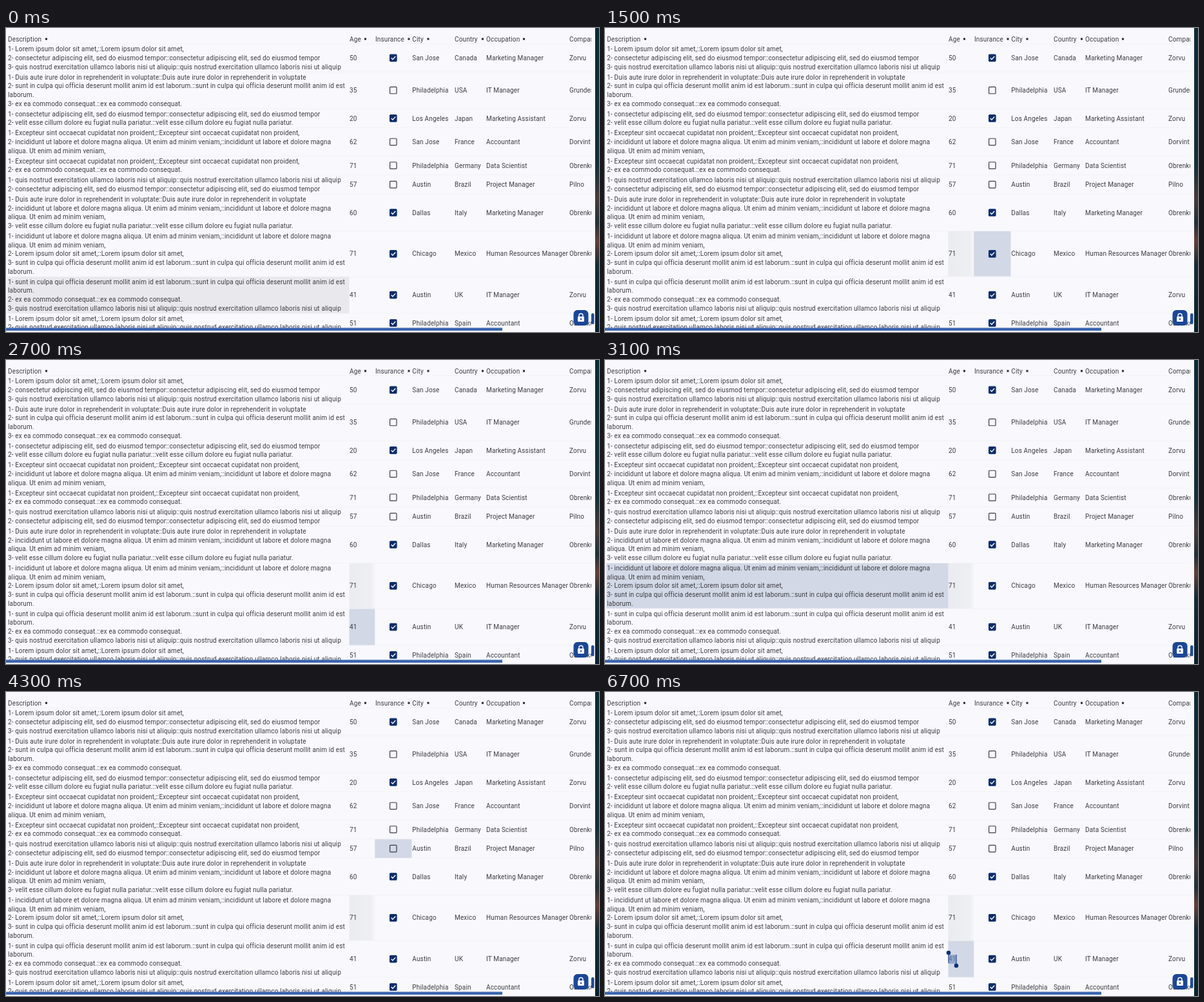
Write an HTML page that moves like this. It is 920x471 px and loops after 8 s.

```html
<!DOCTYPE html>
<html lang="en">
<head>
<meta charset="utf-8">
<title>Employee table</title>
<style>
  html, body { margin: 0; width: 100%; height: 100%; overflow: hidden; background: #f9f9fd; }
  svg { display: block; }
  text { font: 10px Roboto, Arial, sans-serif; letter-spacing: .145px; fill: #3b3b42; white-space: pre; }
</style>
</head>
<body>
<svg id="stage" width="920" height="471" viewBox="0 0 920 471">
  <defs>
    <linearGradient id="photo" x2="0" y2="1">
      <stop offset="0" stop-color="#0b2b38"/>
      <stop offset=".45" stop-color="#12303a"/>
      <stop offset=".56" stop-color="#4a3a38"/>
      <stop offset=".64" stop-color="#20313a"/>
      <stop offset=".7" stop-color="#643f38"/>
      <stop offset=".78" stop-color="#152c36"/>
      <stop offset="1" stop-color="#0a2230"/>
    </linearGradient>
    <linearGradient id="shade">
      <stop offset="0" stop-color="#ebecf0"/>
      <stop offset=".85" stop-color="#eeeff3"/>
      <stop offset="1" stop-color="#f6f6fa"/>
    </linearGradient>
    <clipPath id="bounds"><path d="M0 0H908V465H0z"/></clipPath>
  </defs>
  <rect width="920" height="471" fill="#f9f9fd"/>
  <g id="marks"></g>
  <g id="grid" clip-path="url(#bounds)"></g>
  <g id="selection" fill="#0b3178" opacity="0">
    <rect x="533" y="407" width="12" height="14" fill="#6f8fc4" opacity=".65"/>
    <path d="M532.5 404h1v16h-1zM544.5 407h1v17h-1z"/>
    <circle cx="533" cy="404" r="3.3"/><circle cx="545" cy="424" r="3.3"/>
  </g>
  <path d="M0 464.5H770V469H0z" fill="#3c66b0"/>
  <rect x="914" width="6" height="471" fill="url(#photo)"/>
  <rect x="908" y="442" width="4.5" height="17" rx="2.2" fill="#1f4b9b"/>
  <rect x="880.5" y="437" width="23" height="24" rx="6" fill="#1b4797"/>
  <path d="M889 447.5V445.5a3 3 0 0 1 6 0V447.5" fill="none" stroke="#fff" stroke-width="1.4"/>
  <rect x="887" y="447" width="10" height="8" rx="1" fill="#fff"/>
  <circle cx="892" cy="451" r="1.2" fill="#1b4797"/>
</svg>
<script>
const $ = id => document.getElementById(id);
const grid = $('grid'), marks = $('marks'), selection = $('selection');

function add(parent, tag, attrs, content = '') {
  const el = document.createElementNS('http://www.w3.org/2000/svg', tag);
  for (const key in attrs) el.setAttribute(key, attrs[key]);
  el.textContent = content;
  parent.append(el);
  return el;
}
const label = (x, mid, content) => add(grid, 'text', { x, y: mid + 3.6 }, content);

// "|" marks where the repeated half wraps.
const phrases = {
  L: 'Lorem ipsum dolor sit amet,',
  C: 'consectetur adipiscing elit, sed do eiusmod tempor',
  Q: 'quis nostrud exercitation ullamco laboris nisi ut aliquip',
  D: 'Duis aute irure dolor in reprehenderit in voluptate',
  S: 'sunt in culpa qui officia deserunt mollit anim id est |laborum.',
  X: 'ex ea commodo consequat.',
  V: 'velit esse cillum dolore eu fugiat nulla pariatur.',
  E: 'Excepteur sint occaecat cupidatat non proident,',
  I: 'incididunt ut labore et dolore magna |aliqua. Ut enim ad minim veniam,'
};
const data = [
  ['LCQ', 50, 1, 'San Jose', 'Canada', 'Marketing Manager', 'Zorvu'],
  ['DSX', 35, 0, 'Philadelphia', 'USA', 'IT Manager', 'Grundemar'],
  ['CV', 20, 1, 'Los Angeles', 'Japan', 'Marketing Assistant', 'Zorvu'],
  ['EI', 62, 0, 'San Jose', 'France', 'Accountant', 'Dorvint'],
  ['EX', 71, 0, 'Philadelphia', 'Germany', 'Data Scientist', 'Obrenku'],
  ['QC', 57, 0, 'Austin', 'Brazil', 'Project Manager', 'Pilno'],
  ['DIV', 60, 1, 'Dallas', 'Italy', 'Marketing Manager', 'Obrenku'],
  ['ILS', 71, 1, 'Chicago', 'Mexico', 'Human Resources Manager', 'Obrenku'],
  ['SXQ', 41, 1, 'Austin', 'UK', 'IT Manager', 'Zorvu'],
  ['LQ', 51, 1, 'Philadelphia', 'Spain', 'Accountant', 'Obrenku']
];
const headers = ['Description', 'Age', 'Insurance', 'City', 'Country', 'Occupation', 'Company'];
const dots = [62.5, 557.5, 625, 655, 739.5, 803.5];
const edges = [2, 532.5, 572.3, 629.5, 695, 744.3, 873];
const textX = [3, 533, 573, 630.3, 696, 745, 874];
const LINE = 13.65;

headers.forEach((name, i) => label(textX[i], 17, name));
dots.forEach(x => add(grid, 'rect', { x: x - 1.5, y: 15.5, width: 3, height: 3, fill: '#26262c' }));

function checkbox(mid, on) {
  add(grid, 'rect', {
    x: 595.6, y: mid - 5.2, width: 10.4, height: 10.4, rx: 1,
    fill: on ? '#0b2d6c' : 'none', stroke: on ? '#0b2d6c' : '#3b3b42', 'stroke-width': 1.2
  });
  if (on) add(grid, 'path', {
    d: `M597.7 ${mid}l2.2 2.4 4.3 -4.7`, fill: 'none', stroke: '#fff', 'stroke-width': 1.4
  });
}

const rows = [];
let nextY = 24.7;
for (const [keys, age, insured, ...rest] of data) {
  const lines = [...keys].flatMap((key, i) => {
    const phrase = phrases[key];
    return `${i + 1}- ${phrase.replace('|', '')}::${phrase}`.split('|');
  });
  const y = nextY, height = lines.length * LINE + 2.4, mid = y + height / 2;
  add(grid, 'path', { d: `M0 ${y}H908`, stroke: '#f2f2f7' });
  lines.forEach((line, i) => label(textX[0], y + 1.2 + LINE * (i + .5), line));
  label(textX[1], mid, age);
  checkbox(mid, insured);
  rest.forEach((value, i) => label(textX[i + 3], mid, value));
  rows.push({ y, height });
  nextY += height;
}

const cellBox = (row, col) => ({ ...rows[row], x: edges[col], width: edges[col + 1] - edges[col] });
const addCell = (row, col, fill) => add(marks, 'rect', { ...cellBox(row, col), fill });
const fading = addCell(8, 0, '#e9e9ed');
const trace = addCell(7, 1, 'url(#shade)');
const hover = addCell(7, 1, '#d2d8e5');

// [start in ms, row, column, opacity]
const steps = [
  [0, 7, 1, 0], [600, 7, 1, .5], [700, 7, 1, 1], [1500, 7, 2, 1], [1600, 7, 3, 1],
  [1800, 7, 4, 1], [2000, 7, 5, 1], [2100, 8, 4, 1], [2200, 8, 3, 1],
  [2600, 8, 2, 1], [2700, 8, 1, 1], [2800, 8, 0, 1], [3100, 7, 0, 1],
  [3400, 6, 0, 1], [3600, 5, 0, 1], [3700, 5, 1, 1], [4300, 5, 2, 1],
  [4600, 5, 3, 1], [4900, 6, 3, 1], [5100, 7, 3, 1], [5200, 8, 3, 1],
  [5700, 8, 2, 1], [5800, 8, 1, 1]
];
const show = (el, on) => el.setAttribute('opacity', +on);

function draw() {
  const t = performance.now() % 8000;
  const [, row, col, alpha] = steps.filter(step => step[0] <= t).pop();
  const box = cellBox(row, col);
  for (const key in box) hover.setAttribute(key, box[key]);
  show(hover, alpha);
  show(fading, t < 200);
  show(trace, t >= 1500);
  show(selection, t >= 6700);
  requestAnimationFrame(draw);
}
draw();
</script>
</body>
</html>
```
